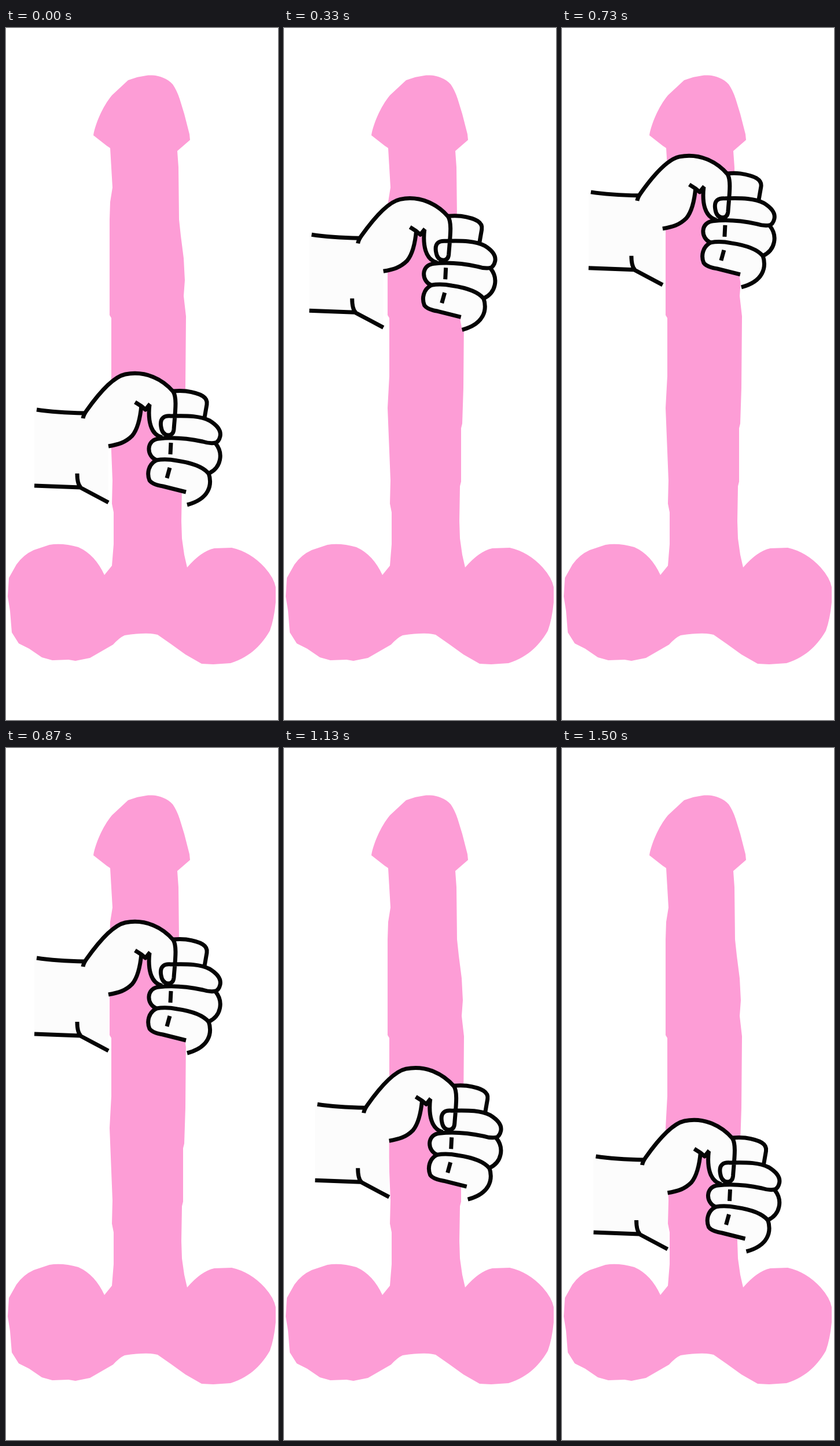
Animation, 470 px wide and 1193 px high, one loop 5010 ms. Source, as an HTML page:

```html
<!DOCTYPE html>
<html lang="en">
<head>
<meta charset="utf-8">
<title>Cartoon hand</title>
<style>
html, body { margin: 0; width: 100%; height: 100%; overflow: hidden; background: #fff; }
svg { display: block; width: 100vw; height: 100vh; }
.line { fill: none; stroke: #050505; stroke-width: 7; stroke-linejoin: round; }
</style>
</head>
<body>
<svg viewBox="0 0 470 1193" preserveAspectRatio="none">
  <path fill="#fd9dd6" d="M151 185C154 166 167 135 183 116L211 90 217 88Q227 84 237 83C250 79 274 82 288 97
    Q295 107 300 122L308 148 317 183 318 193 296 212 298 240 299 330 302 358 307 397 309 435 307 462 311 497
    310 620 308 682 306 690 306 782 304 790 303 850 304 880 308 908 313 930Q337 902 360 897L390 896
    Q422 903 447 930 463 948 466 964L466 990Q463 1020 456 1039C444 1060 424 1084 388 1095
    L358 1097 338 1096 310 1080 285 1062 262 1046Q245 1041 205 1047 196 1051 185 1063L145 1086 120 1091 108 1089 80 1090
    62 1085 40 1070 22 1061 10 1042 7 1005 3 980 5 948 18 925Q30 908 48 900L75 891Q97 887 125 895
    154 908 170 943L183 927 186 890 186 835 183 820 184 780 179 655 182 600 182 500 179 495 179 330 180 300
    184 275 180 207 174 203Z"/>
  <g id="hand">
    <path fill="#fcfcfc" d="M43 271L128 276C146 252 175 214 200 209 235 202 265 218 282 238L304 238
      Q343 243 341 261L338 284Q371 297 364 318L358 328Q375 350 344 380C351 400 345 424 307 434
      L304 418 305 412 250 400C236 392 236 365 252 357 237 349 236 325 256 319L264 318
      C242 310 239 285 242 266L235 272 228 266C226 285 222 303 212 315 200 327 188 330 171 333
      L171 430 122 404 43 402Z"/>
    <g class="line">
      <path d="M47 270Q80 275 130 276M43 401L122 404L171 430M117 380Q117 398 123 404"/>
      <path d="M127 285Q128 279 133 272C150 248 177 214 200 209C235 202 265 218 283 239
        C290 250 286 276 284 304Q283 314 274 314Q264 313 262 300C259 284 268 280 279 281
        C310 280 330 281 346 289Q367 302 364 316Q362 325 355 328"/>
      <path d="M282 238Q295 237 305 238C332 242 343 249 341 261L337 284"/>
      <path d="M217 257L228 264L235 270L243 260M228 262C226 285 222 303 212 315C200 327 188 330 171 333
        M242 261C239 287 243 313 264 318"/>
      <path d="M356 328C370 345 366 370 344 380C335 369 317 362 290 358Q270 354 254 357
        C236 350 236 322 258 320C290 316 320 322 334 325Q347 329 356 327"/>
      <path d="M254 357C240 364 237 380 242 392Q247 399 265 402L305 412M344 379C351 400 345 424 307 434"/>
      <path d="M279 327L278 347M277 370L272 388"/>
    </g>
  </g>
</svg>
<script>
const hand = document.getElementById('hand');
const LOOP = 5010, LAST = 45;

// [step, x, y] at about 30 steps a second
const keys = [
  [0, 6, 388], [5, 2, 202], [16, 0, 0], [19, 1, -12], [26, 6, 92],
  [31, 9.5, 299], [32, 10, 313], [38, 11.5, 398], [45, 11.5, 434]
];

const rate = (i, c) => (keys[i + 1][c] - keys[i][c]) / (keys[i + 1][0] - keys[i][0]);

// Monotone slopes keep the curve from overshooting its keys
function slope(i, c) {
  if (i === 0) return rate(0, c) * 1.2;
  if (i === keys.length - 1) return 0;
  const a = rate(i - 1, c), b = rate(i, c);
  return a * b > 0 ? 2 * a * b / (a + b) : 0;
}

function at(step, c) {
  let i = 0;
  while (i < keys.length - 2 && step > keys[i + 1][0]) i++;
  const [a, b] = [keys[i], keys[i + 1]];
  const span = b[0] - a[0], u = (step - a[0]) / span, v = 1 - u;
  return a[c] * v * v * (1 + 2 * u) + b[c] * u * u * (3 - 2 * u)
    + span * u * v * (slope(i, c) * v - slope(i + 1, c) * u);
}

function draw(now) {
  const t = Math.floor(now % LOOP / 10) * 10;
  const step = Math.min(LAST, Math.floor((t + 4) * 0.03));
  hand.setAttribute('transform', `translate(${at(step, 1)} ${at(step, 2)})`);
}

let start;
function tick(now) {
  start ??= now;
  draw(now - start);
  requestAnimationFrame(tick);
}
draw(0);
requestAnimationFrame(tick);
</script>
</body>
</html>
```
